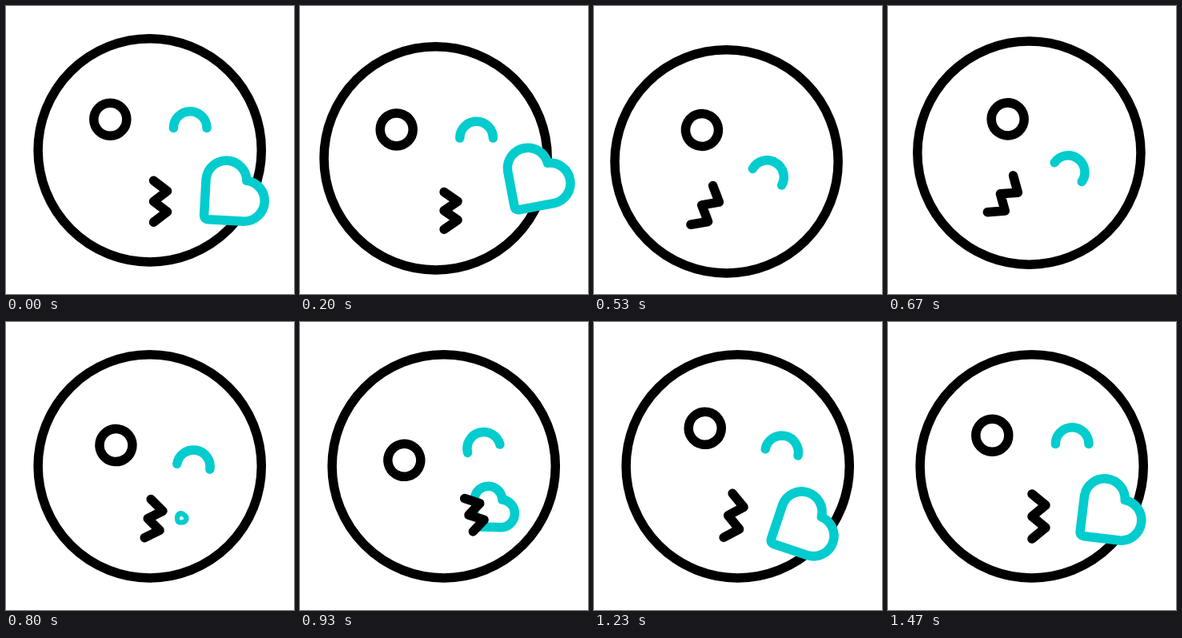
An HTML page for the animation above (1670 ms loop, 360 by 360 pixels).

```html
<!DOCTYPE html>
<html lang="en">
<head>
<meta charset="utf-8">
<title>Blowing a kiss</title>
<style>
  html, body { margin: 0; width: 100%; height: 100%; overflow: hidden; background: #fff; }
  svg { display: block; width: 100%; height: 100%; }
  svg * { fill: none; stroke-width: 11.5; stroke-linecap: round; stroke-linejoin: round; }
  .dark { stroke: #000; }
  .cyan { stroke: #02cccd; }
  #heart { fill: #fff; }
</style>
</head>
<body>
<svg viewBox="0 0 360 360">
  <clipPath id="front"><rect id="frontArea" x="7" y="-400" width="800" height="800"/></clipPath>
  <circle id="face" class="dark" cx="-.3" cy=".3" r="139.6"/>
  <g id="eyes">
    <circle class="dark" cx="-49.7" cy="-38.2" r="20.5"/>
    <path class="cyan" d="M29.4-27.5a20.8 20.8 0 0 1 41.6 0"/>
  </g>
  <g clip-path="url(#front)">
    <g id="fade">
      <path id="heart" class="cyan" d="M-4-4L-35.5-35.5A25.5 25.5 0 0 1 0-72A25.5 25.5 0 0 1 35.5-35.5L4-4Q0 0-4-4Z"/>
    </g>
  </g>
  <polyline id="mouth" class="dark"/>
</svg>
<script>
const LOOP = 1670, MOVE_END = 1470;
const FLIGHT_WRAP = 1525; // the heart's flight runs on past the loop point
const $ = id => document.getElementById(id);
const set = (id, name, value) => $(id).setAttribute(name, value);

// Eased 0 to 1 between two times, and a rise followed by a fall.
function ease(t, from, to) {
  const p = Math.min(1, Math.max(0, (t - from) / (to - from)));
  return p * p * (3 - 2 * p);
}
const bump = (t, from, peak, to) => ease(t, from, peak) - ease(t, peak, to);

function drawHead(t) {
  const lean = 20 * bump(t, 0, 400, 765);
  const turn = 36.6 * bump(t, 250, 640, 950) - 15 * bump(t, 640, 950, 1230) + 11.3 * bump(t, 950, 1230, 1470);
  const drop = 19.5 * (ease(t, 120, 480) - ease(t, 900, 1180));
  const pucker = 0.25 * (bump(t, -60, 110, 340) + bump(t, 700, 900, 1130));

  const head = `translate(${180 - lean} ${180 + lean})`;
  const turned = `${head} rotate(${turn})`;
  const lips = `${turned} translate(${62 * pucker} ${63 + 17 * pucker})`;
  set('face', 'transform', head);
  set('eyes', 'transform', `${turned} translate(${drop * 0.18} ${drop})`);
  set('mouth', 'transform', lips);
  set('mouth', 'points', [-2, -1, 0, 1, 2].map(n => [n % 2 ? 17 : 0, n * 14 * (1 - pucker)]).join(' '));
  set('frontArea', 'transform', lips);
}

function drawHeart(t) {
  const grow = ease(t, 790, 1200);
  const x = 217 + 24 * ease(t, 1140, 1560) + 28 * ease(t, 1430, 1730);
  const y = 248 + 28 * grow - 9 * ease(t, 1220, 1470) - 18 * ease(t, 1480, 1900);
  const turn = 40 + 24.5 * grow - 42 * ease(t, 1147, 2037);
  const scale = ease(t, 750, 1040);
  $('fade').style.display = scale > 0.01 ? '' : 'none';
  set('fade', 'opacity', 1 - ease(t, 1830, 1960));
  set('heart', 'transform', `translate(${x} ${y}) rotate(${turn}) scale(${scale})`);
  $('heart').style.strokeWidth = 11.5 / Math.max(scale, 0.01);
}

const start = performance.now();
function tick() {
  const t = Math.min((performance.now() - start) % LOOP, MOVE_END);
  drawHead(t);
  drawHeart(t < 600 ? t + FLIGHT_WRAP : t);
  requestAnimationFrame(tick);
}
tick();
</script>
</body>
</html>
```
